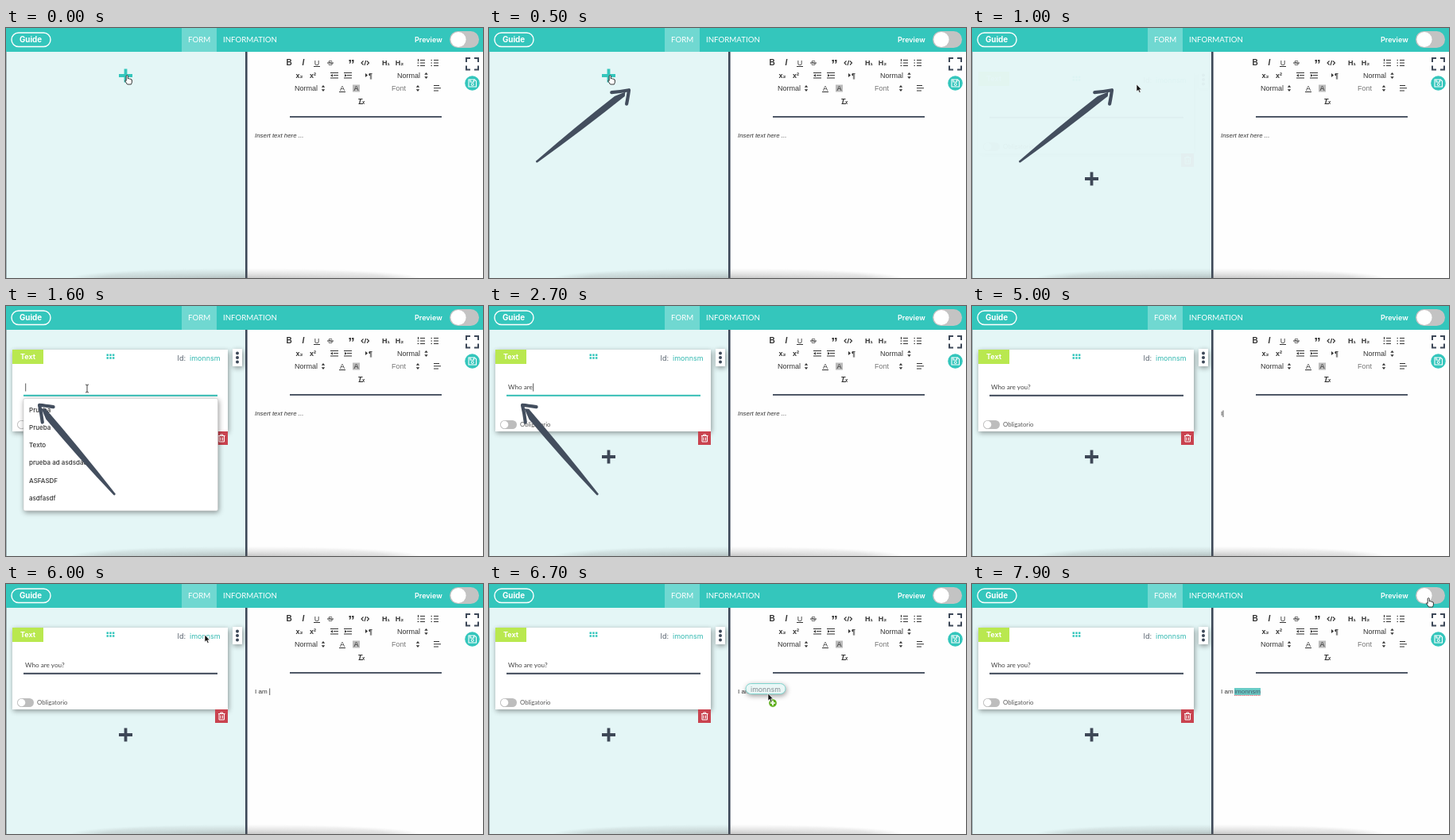
An HTML page that plays this animation: 600x315 px, repeating every 8 s.

```html
<!DOCTYPE html>
<html lang="en">
<head>
<meta charset="utf-8">
<title>Form builder</title>
<style>
html, body { margin: 0; width: 100%; height: 100%; overflow: hidden; background: #fff; }
svg { display: block; width: 600px; height: 315px; }
text { font-family: Inter, sans-serif; }
.lato { font-family: Lato, sans-serif; }
.edit { font: 8.1px "Liberation Sans", Arial, sans-serif; fill: #333; white-space: pre; }
.tools text { font: 9px "Liberation Sans", Arial, sans-serif; fill: #333; }
.tools .mid { text-anchor: middle; }
.line { fill: none; stroke: #333; }
.cap { font: 9.7px Lato, sans-serif; fill: #fff; }
.shadow { filter: drop-shadow(1px 2px 3px #0006); }
</style>
</head>
<body>
<svg viewBox="0 0 600 315">
  <defs>
    <radialGradient id="dim" cx=".5" cy="1" r=".5" gradientTransform="matrix(1 0 0 2 0 -1)">
      <stop offset="0" stop-color="#555" stop-opacity=".32"/>
      <stop offset=".8" stop-color="#555" stop-opacity=".2"/>
      <stop offset="1" stop-color="#555" stop-opacity="0"/>
    </radialGradient>
    <linearGradient id="rise" x2="0" y2="1">
      <stop offset="0" stop-color="#000"/><stop offset="1" stop-color="#fff"/>
    </linearGradient>
    <mask id="fade"><rect x="80" y="302" width="440" height="13" fill="url(#rise)"/></mask>
    <g id="arrow" fill="#434e5e">
      <path d="M0-1.3Q65-5 128-5L142-1 138 3Q75 4 0 1.4Q-2 0 0-1.3Z"/>
      <path d="M128-11Q137-5 147 0Q142 5 134 12" fill="none" stroke="#434e5e" stroke-width="4.2" stroke-linecap="round" stroke-linejoin="round"/>
    </g>
    <path id="spin" d="M-2.2-1.2L0-4 2.2-1.2ZM-2.2 1.2L0 4 2.2 1.2Z" fill="#333"/>
  </defs>

  <rect width="600" height="315" fill="#fefefe"/>
  <rect y="30" width="301" height="285" fill="#e4f6f6"/>
  <path d="M.5 30V315" stroke="#9fb2b5" stroke-width="1"/>
  <rect x="301" y="30" width="2.6" height="285" fill="#3d4858"/>

  <!-- header -->
  <rect width="600" height="30" fill="#34c6bc"/>
  <rect x="221" width="44" height="30" fill="#70d8d1"/>
  <rect x="7" y="6" width="49" height="17.5" rx="8.7" fill="none" stroke="#fff" stroke-width="1.4"/>
  <g fill="#fff">
    <text x="17" y="18.2" font-size="9.8" font-weight="700">Guide</text>
    <text class="cap" x="229" y="18.3">FORM</text>
    <text class="cap" x="273" y="18.3">INFORMATION</text>
    <text x="514" y="18.2" font-size="9" font-weight="600">Preview</text>
  </g>
  <rect x="558" y="4" width="37" height="21" rx="10.5" fill="#c3c3c3"/>
  <circle cx="569" cy="14.5" r="9.6" fill="#fff"/>

  <!-- editor tools -->
  <g class="tools" id="tools">
    <text x="492" y="63">Normal</text><text x="363" y="79">Normal</text>
    <text x="485" y="79" style="fill:#777">Font</text>
    <use href="#spin" x="528.5" y="60"/><use href="#spin" x="399" y="76"/><use href="#spin" x="518" y="76"/>
    <path class="line" d="M387 48.5H395M404 44H412M419 80.5H427M443.500 95.500H449" stroke-width="1"/>
    <path class="line" d="M449.500 41.500L447 44 449.500 46.500M454 41.500L456.500 44 454 46.500M452.700 41L451 47" stroke-width="1.1"/>
    <path class="line" d="M521 40.500H527M521 44H527M521 47.500H527M538 40.500H544M538 44H544M538 47.500H544" stroke-width="1.1"/>
    <path class="line" d="M518.500 39V42M517.500 44H519.500M517.500 47.500H519.500M534.500 40.500H536M534.500 44H536M534.500 47.500H536" stroke-width="1.1"/>
    <path class="line" d="M408 56.500H418M412 59.500H418M408 63H418M425 56.500H435M429 59.500H435M425 63H435M538 72.500H545M538 75.800H547M538 79H544" stroke-width="1.1"/>
    <path d="M411 58V61.500L408 59.700ZM426 58V61.500L429 59.700ZM452 57V62L455 59.500Z" fill="#333"/>
    <rect x="436" y="71.500" width="9" height="9" fill="#bbb"/>
  </g>
  <rect x="357" y="111" width="191" height="1.800" fill="#3d4858"/>
  <path d="M579 43V38H584M589 38H594V43M594 47.500V52.500H589M584 52.500H579V47.500" fill="none" stroke="#3d4858" stroke-width="2"/>
  <circle cx="586.500" cy="69.500" r="9.300" fill="#34c6bc"/>
  <path d="M582 65H589.500L591.500 67V74H582ZM584 65V68H588.500V65" fill="none" stroke="#fff" stroke-width="1.100"/>
  <circle cx="586.700" cy="71" r="1.500" fill="none" stroke="#fff"/>

  <!-- editor text -->
  <text class="edit" id="hint" x="313" y="138.300" style="font-style:italic;font-size:7.900px">Insert text here ...</text>
  <text class="edit" id="answer" x="313" y="138.300"></text>
  <path id="answerCaret" d="M0 131.500V140" stroke="#333" stroke-width=".8"/>
  <g id="token">
    <rect x="330" y="131" width="33" height="9" fill="#69cbc6"/>
    <text class="edit" x="330.200" y="138.300" style="fill:#456">imonnsm</text>
    <path d="M330 140.300H363" stroke="#e0525c" stroke-dasharray="1.500 1"/>
  </g>

  <path id="plus" d="M-8.500 0H8.500M0-8.500V8.500" stroke-width="3.800"/>

  <!-- question card -->
  <g id="card">
    <rect class="shadow" x="8" y="55" width="271" height="103" fill="#fff"/>
    <rect x="8" y="55" width="39" height="18" fill="#b9e84f"/>
    <text x="18" y="67.300" font-size="9" font-weight="700" fill="#fff">Text</text>
    <path d="M126.500 61.800H136.500M126.500 65.500H136.500" stroke="#34c6bc" stroke-width="2.400" stroke-dasharray="2.500 1.200"/>
    <text x="215.500" y="69" font-size="9" fill="#5b6570">Id:</text>
    <text x="231" y="69" font-size="9" fill="#34b9b1">imonnsm</text>
    <rect class="shadow" x="285" y="54" width="12" height="22" fill="#fff"/>
    <g fill="#3d4858"><circle cx="291" cy="59.500" r="2"/><circle cx="291" cy="65" r="2"/><circle cx="291" cy="70.500" r="2"/></g>
    <text class="lato" id="question" x="24" y="105" font-size="8.200" fill="#444" style="white-space:pre"></text>
    <path id="questionCaret" d="M0 97.500V107.500" stroke="#333" stroke-width=".8"/>
    <rect id="rule" x="22" y="111.800" width="244" height="2"/>
    <rect x="14" y="144" width="21" height="11" rx="5.500" fill="#bdbdbd"/>
    <circle cx="19.600" cy="149.500" r="4.700" fill="#fff"/>
    <text class="lato" x="39" y="152.300" font-size="7.800" fill="#555">Obligatorio</text>
    <rect x="263" y="158" width="16" height="17" fill="#c9434f"/>
    <path d="M267 163.500H275.500M269.800 163.300V162H272.700V163.300M268 164V171H274.500V164M270 165.500V169.500M272.500 165.500V169.500" fill="none" stroke="#fff" stroke-width="1"/>
  </g>

  <g id="menu">
    <rect class="shadow" x="22" y="116.500" width="244.500" height="141.500" rx="2" fill="#fff" stroke="#ccc" stroke-width=".6"/>
  </g>
  <use id="arrowUp" href="#arrow" transform="translate(60 168.500) rotate(-37.900)"/>
  <use id="arrowBack" href="#arrow" transform="translate(136.500 237.500) rotate(-130)"/>

  <rect x="80" y="302" width="440" height="13" fill="url(#dim)" mask="url(#fade)"/>

  <g id="mouse">
    <g id="drag">
      <rect class="shadow" x="-28" y="-14.500" width="50" height="13" rx="6.500" fill="#e9f7f6" stroke="#7fd5cf"/>
      <text x="-22" y="-4.500" font-size="8.800" fill="#858c92">imonnsm</text>
      <circle cx="6" cy="10" r="5.200" fill="#5fae1c" stroke="#fff" stroke-width=".7"/>
      <path d="M3 10H9M6 7V13" stroke="#fff" stroke-width="1.700"/>
    </g>
    <path id="pointer" d="M0-2V7L2.100 5.200 3.600 8.500 5.100 7.800 3.700 4.700H6.300Z" fill="#111" stroke="#fff" stroke-width=".6"/>
    <path id="hand" d="M-.8-1.800Q.4-3 1.300-1.800V2Q2.600 1 3.300 2.200Q4.600 1.500 5 2.800Q6.400 2.400 6.400 4V6Q6.200 7.500 5.400 9H.6Q-1.200 6.500-2.400 4.600Q-2.200 3.200-.8 4.500Z" fill="#fff" stroke="#222" stroke-width=".9"/>
    <path id="beam" d="M-2-5Q0-5 0-3.800Q0-5 2-5M0-4V4M-2 5Q0 5 0 3.800Q0 5 2 5" fill="none" stroke="#333" stroke-width=".9"/>
  </g>
</svg>
<script>
const $ = id => document.getElementById(id);
const show = (id, on) => { $(id).style.display = on ? "" : "none"; };
const clamp = v => Math.max(0, Math.min(1, v));

function label(parent, x, y, text, attrs = {}) {
  const el = document.createElementNS("http://www.w3.org/2000/svg", "text");
  Object.entries({ x, y, ...attrs }).forEach(([k, v]) => el.setAttribute(k, v));
  el.textContent = text;
  $(parent).append(el);
}

["Prueba", "Prueba", "Texto", "prueba ad asdsdad", "ASFASDF", "asdfasdf"].forEach((s, i) =>
  label("menu", 29, 134 + i * 22.15, s, { "font-size": 8, "font-weight": 500, fill: "#333" }));

// x, baseline, glyphs, style
[
  [356, 47, "B", "font-weight:700;font-size:10px"],
  [374, 47, "I", "font-style:italic;font-size:10px;font-weight:700"],
  [391, 46.5, "U"], [408, 47, "S"],
  [434.5, 52, "”", "font-weight:700;font-size:17px"],
  [478, 47, "H₁", "font-weight:700"], [495, 47, "H₂", "font-weight:700"],
  [369, 63, "x₂", "font-weight:700"], [386, 63, "x²", "font-weight:700"],
  [458.5, 63, "¶", "font-weight:700"],
  [423, 78.5, "A"], [440.5, 79, "A"],
  [447, 94.5, "Tₓ", "font-style:italic;font-weight:700"]
].forEach(([x, y, s, style = ""]) => label("tools", x, y, s, { class: "mid", style }));

// time, x, y, shape used from that time on
const track = [
  [0, 152, 62, "hand"], [700, 152, 62, "pointer"], [1000, 207, 73, "pointer"],
  [1200, 207, 73, "pointer"], [1500, 102, 104, "beam"], [2000, 102, 104, ""],
  [3800, 102, 104, "beam"], [4000, 130, 110, "pointer"], [4500, 316, 135, "beam"],
  [4900, 316, 135, ""], [5500, 330, 132, "pointer"], [6000, 250, 66, "pointer"],
  [6200, 250, 66, "pointer"], [6700, 351, 140, "pointer"], [7100, 351, 140, "pointer"],
  [7700, 574, 20, "hand"], [8000, 574, 20, "hand"]
];

function moveMouse(t) {
  const i = track.findLastIndex(k => k[0] <= t);
  const [t0, x0, y0, shape] = track[i];
  const [t1, x1, y1] = track[i + 1];
  const p = (t - t0) / (t1 - t0), e = p * p * (3 - 2 * p);
  $("mouse").setAttribute("transform", `translate(${x0 + (x1 - x0) * e} ${y0 + (y1 - y0) * e})`);
  ["hand", "pointer", "beam"].forEach(s => show(s, s === shape));
}

function type(id, text, count, focused) {
  const el = $(id);
  el.textContent = text.slice(0, Math.max(0, count));
  const width = el.textContent ? el.getComputedTextLength() : 0;
  $(id + "Caret").setAttribute("transform", `translate(${+el.getAttribute("x") + width + 0.7} 0)`);
  show(id + "Caret", focused);
}

function draw(t) {
  const added = t >= 1000, focus = t >= 1500 && t < 4500;
  $("plus").setAttribute("transform", `translate(150.5 ${added ? 190 : 60})`);
  $("plus").setAttribute("stroke", added ? "#3e4857" : "#34c6bc");
  $("card").style.opacity = added ? clamp(0.03 + (t - 1000) / 300) : 0;
  $("rule").setAttribute("fill", focus ? "#34bdb5" : "#3d4858");
  show("menu", t >= 1500 && t < 2000);
  show("arrowUp", t >= 300 && t < 1200);
  show("arrowBack", t >= 1400 && t < 3900);
  type("question", "Who are you?", Math.floor((t - 1900) / 110), focus);
  type("answer", "I am ", Math.floor((t - 4900) / 100), t >= 4600 && t < 6200);
  show("hint", t < 5000);
  show("token", t >= 6800);
  show("drag", t >= 6200 && t < 6800);
  moveMouse(t);
}

function frame() {
  draw(Math.floor(performance.now() % 8000 / 100) * 100);
  requestAnimationFrame(frame);
}
frame();
</script>
</body>
</html>
```
